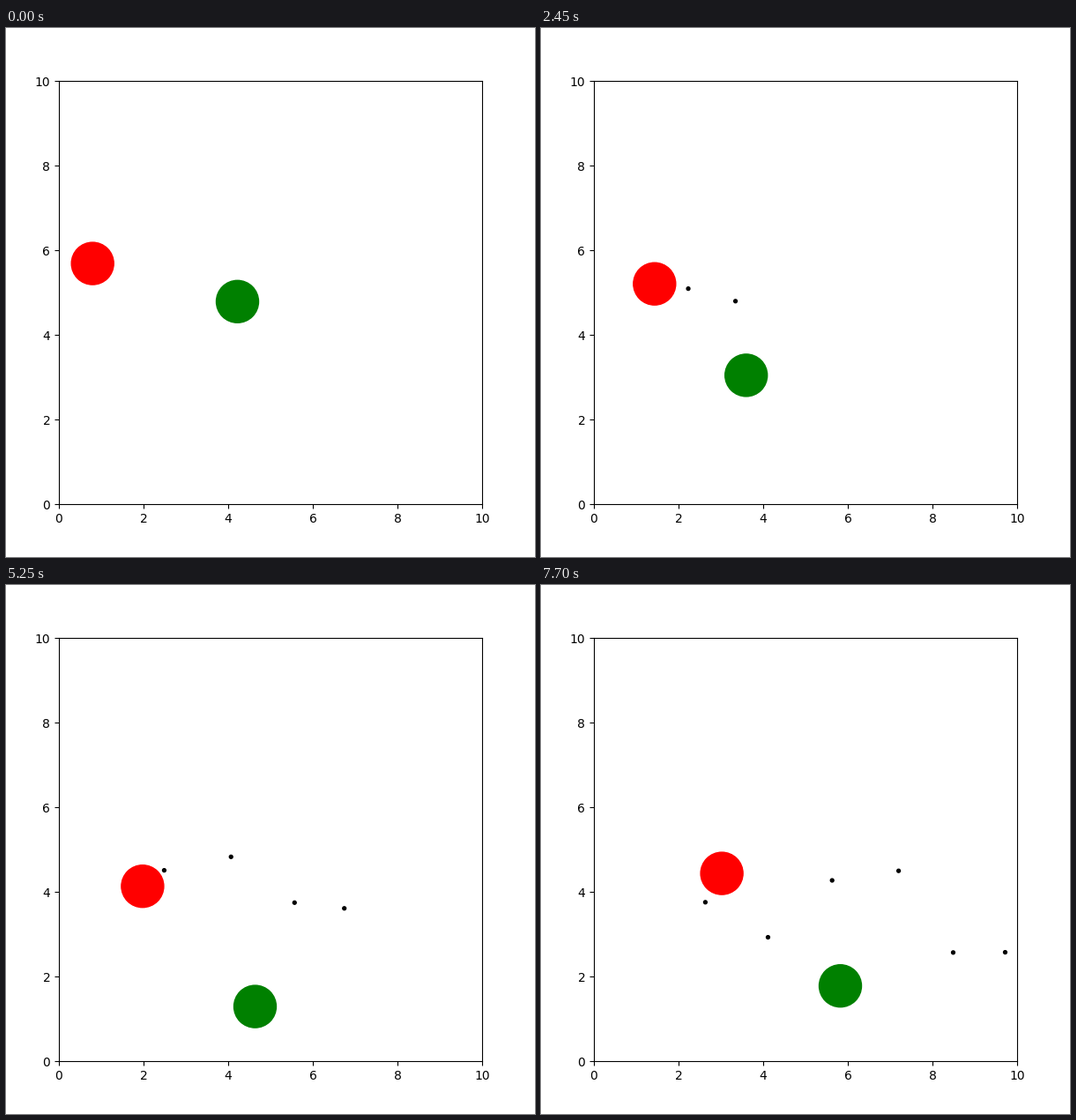
Animation of 600 by 600 pixels, one loop 8 s. Source, as a matplotlib script:

```python
import numpy as np
import matplotlib.pyplot as plt
from matplotlib.animation import FuncAnimation

TICK = 50       # ms per animation frame
HOLD = 7        # frames each pose is held
FRAMES = 160
RELOAD = 4      # poses between two shots
SPEED = 0.45    # shot travel per pose, in axis units
AIMS = (19.24, 21.97, 6.03, 4.33, 28, 101.7)  # degrees below horizontal


def legs(*keys):
    """Straight legs between (pose, x px, y px) turning points."""
    k, x, y = np.transpose(keys)
    x, y = (x - 60) / 48, (540 - y) / 48
    return lambda pose: np.array([np.interp(pose, k, x),
                                  np.interp(pose, k, y)])


hunter = legs((0, 98.2, 267.1), (2, 112.7, 268.8), (5, 134.1, 284.8),
              (7, 128.8, 290.2), (9, 123.9, 299.2), (13, 140.5, 327.4),
              (17, 169.3, 356), (22, 205.1, 327.1))

runner = legs((0, 262.5, 310.3), (1, 262.8, 322.2), (4, 244.2, 358.1),
              (7, 232.7, 393.9), (9, 234.4, 417.9), (11, 245.3, 440.7),
              (13, 262.9, 463), (15, 282.5, 478.1), (16, 291.7, 481),
              (19, 317.7, 472.4), (22, 339.5, 454.7))


def shot(i, pose):
    """Position of shot i, which starts where the hunter stood when firing."""
    fired = i * RELOAD
    aim = np.radians(AIMS[i])
    travel = SPEED * (pose - fired - 1)
    return hunter(fired) + travel * np.array([np.cos(aim), -np.sin(aim)])


fig = plt.figure(figsize=(6, 6), dpi=100)
ax = fig.add_axes([0.1, 0.1, 0.8, 0.8])
ax.set(xlim=(0, 10), ylim=(0, 10))


def disc(radius, color):
    return ax.add_patch(plt.Circle((0, 0), radius, color=color))


red, green = disc(0.5, "red"), disc(0.5, "green")
dots = [disc(0.04, "black") for _ in AIMS]


def update(frame):
    pose = frame // HOLD
    red.center = hunter(pose)
    green.center = runner(pose)
    for i, dot in enumerate(dots):
        dot.center = shot(i, pose)
        dot.set_visible(pose > i * RELOAD)
    return red, green, *dots


anim = FuncAnimation(fig, update, frames=FRAMES, interval=TICK,
                     repeat=True, repeat_delay=0)
plt.show()
```
